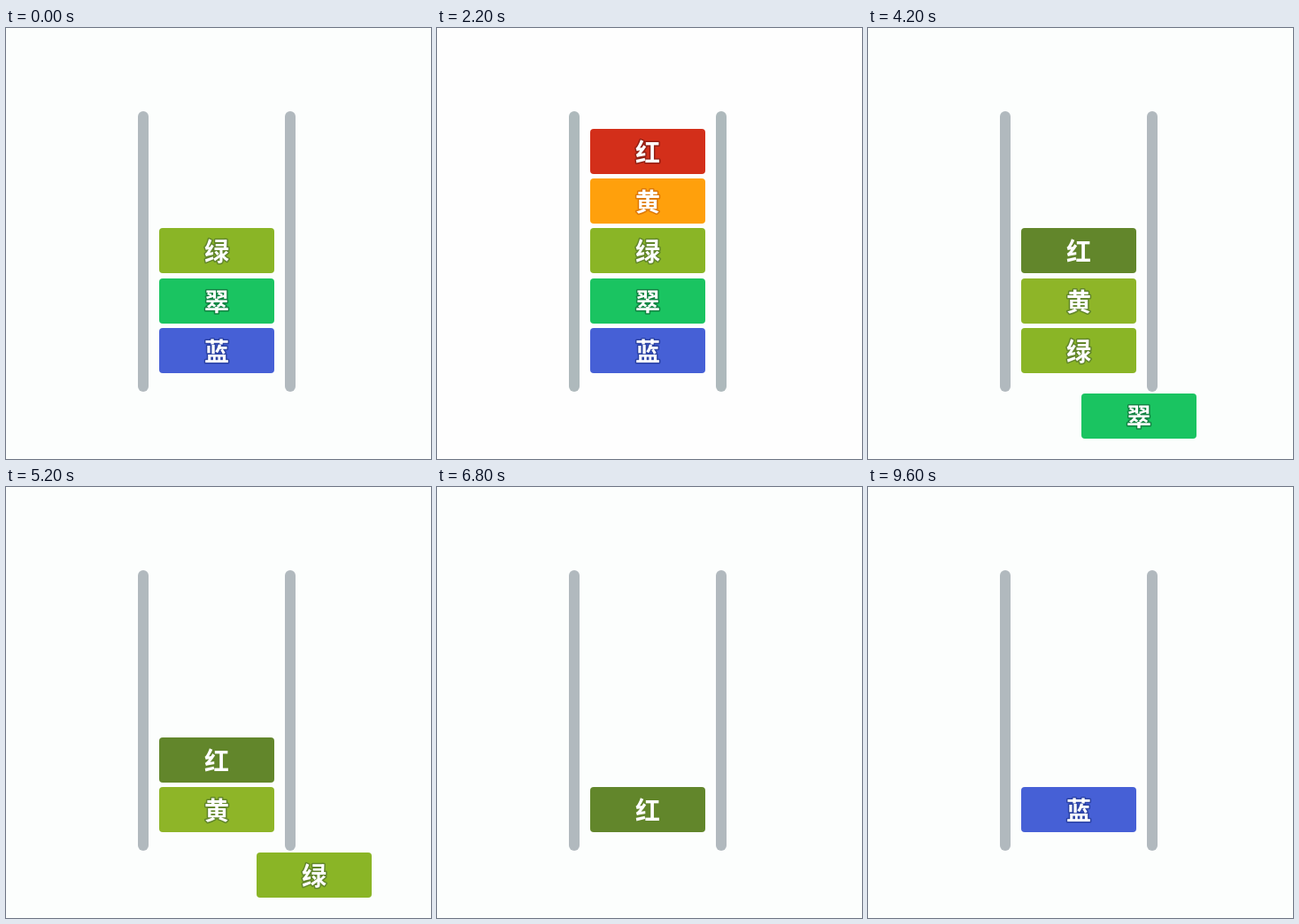
Write an HTML page with a canvas that moves like this. It is 480 px wide and 487 px high and loops after 9800 ms.

```html
<!DOCTYPE html>
<html lang="zh-CN">
<head>
<meta charset="utf-8">
<style>
  html, body { margin: 0; width: 100%; height: 100%; overflow: hidden; background: #fcfefd; }
  canvas { display: block; width: 480px; height: 487px; }
</style>
</head>
<body>
<canvas id="stage" width="480" height="487"></canvas>
<script>
const ctx = document.getElementById('stage').getContext('2d');
const LOOP = 9800, STEP = 200;
const SPEED = 0.491;                 // px per ms, shared by every move
const CARD_W = 130, CARD_H = 51, COLUMN_X = 173, BOTTOM_Y = 339, PITCH = 56.33;
const ENTRY_Y = 30, EXIT_DROP = 74, FALL_DELAY = 165;
const ALWAYS = -9999;

const blue = ['#4660d6', '#2c43a4'];
const emerald = ['#1ac461', '#128443'];
const olive = ['#8ab526', '#62862b'];
const orange = ['#ffa00c', '#dd7808'];
const red = ['#d32f1a', '#942014'];
const mutedOrange = ['#8eb528', '#62862b'];
const mutedRed = ['#62862b', '#62862b'];

const cards = [
  { label: '蓝', paint: blue, slot: 0, enter: ALWAYS, leave: 2540 },
  { label: '翠', paint: emerald, slot: 1, enter: ALWAYS, leave: 3910 },
  { label: '绿', paint: olive, slot: 2, enter: ALWAYS, leave: 4825 },
  { label: '黄', paint: orange, muted: mutedOrange, slot: 3, enter: 150, leave: 5978 },
  { label: '红', paint: red, muted: mutedRed, slot: 4, enter: 1390, leave: 7110 },
  { label: '蓝', paint: blue, slot: 0, enter: 8217, leave: Infinity }
];

const travelled = (t, start) => Math.max(0, (t - start) * SPEED);

function position(card, t) {
  const entry = travelled(t, card.enter);
  const across = COLUMN_X + CARD_W;
  let x = Math.min(COLUMN_X, entry - CARD_W);
  let y = Math.min(BOTTOM_Y - card.slot * PITCH, ENTRY_Y + Math.max(0, entry - across));

  // Each earlier departure lets this card fall by one slot.
  for (const { leave } of cards) {
    if (leave > card.enter && leave < card.leave) {
      y += Math.min(PITCH, travelled(t, leave + FALL_DELAY));
    }
  }
  const exit = travelled(t, card.leave);
  y += Math.min(EXIT_DROP, exit);
  x += Math.max(0, exit - EXIT_DROP);
  return [Math.round(x), Math.round(y)];
}

function roundBox(x, y, w, h, r, color) {
  ctx.fillStyle = color;
  ctx.beginPath();
  ctx.roundRect(x, y, w, h, r);
  ctx.fill();
}

function drawCard(card, t, vivid) {
  const [x, y] = position(card, t);
  if (x <= -CARD_W || x >= 480) return;
  const [face, edge] = vivid ? card.paint : card.muted || card.paint;
  roundBox(x, y, CARD_W, CARD_H, 4, face);
  ctx.strokeStyle = edge;
  ctx.strokeText(card.label, x + CARD_W / 2, y + 37);
  ctx.fillStyle = '#fff';
  ctx.fillText(card.label, x + CARD_W / 2, y + 37);
}

function draw(t) {
  const vivid = t >= 200 && t < 3400;
  ctx.fillStyle = vivid ? '#fefefe' : '#fcfefd';
  ctx.fillRect(0, 0, 480, 487);
  for (const x of [149, 315]) roundBox(x, 94, 12, 317, 6, vivid ? '#aeb9bc' : '#b1b9be');

  ctx.font = 'bold 28px "Noto Sans CJK SC", "Noto Sans CJK", sans-serif';
  ctx.textAlign = 'center';
  ctx.lineJoin = 'round';
  ctx.lineWidth = 3;
  for (const card of cards) drawCard(card, t, vivid);
}

const origin = performance.now();
function tick() {
  const t = (performance.now() - origin) % LOOP;
  draw(Math.floor(t / STEP) * STEP);
  requestAnimationFrame(tick);
}
tick();
</script>
</body>
</html>
```
